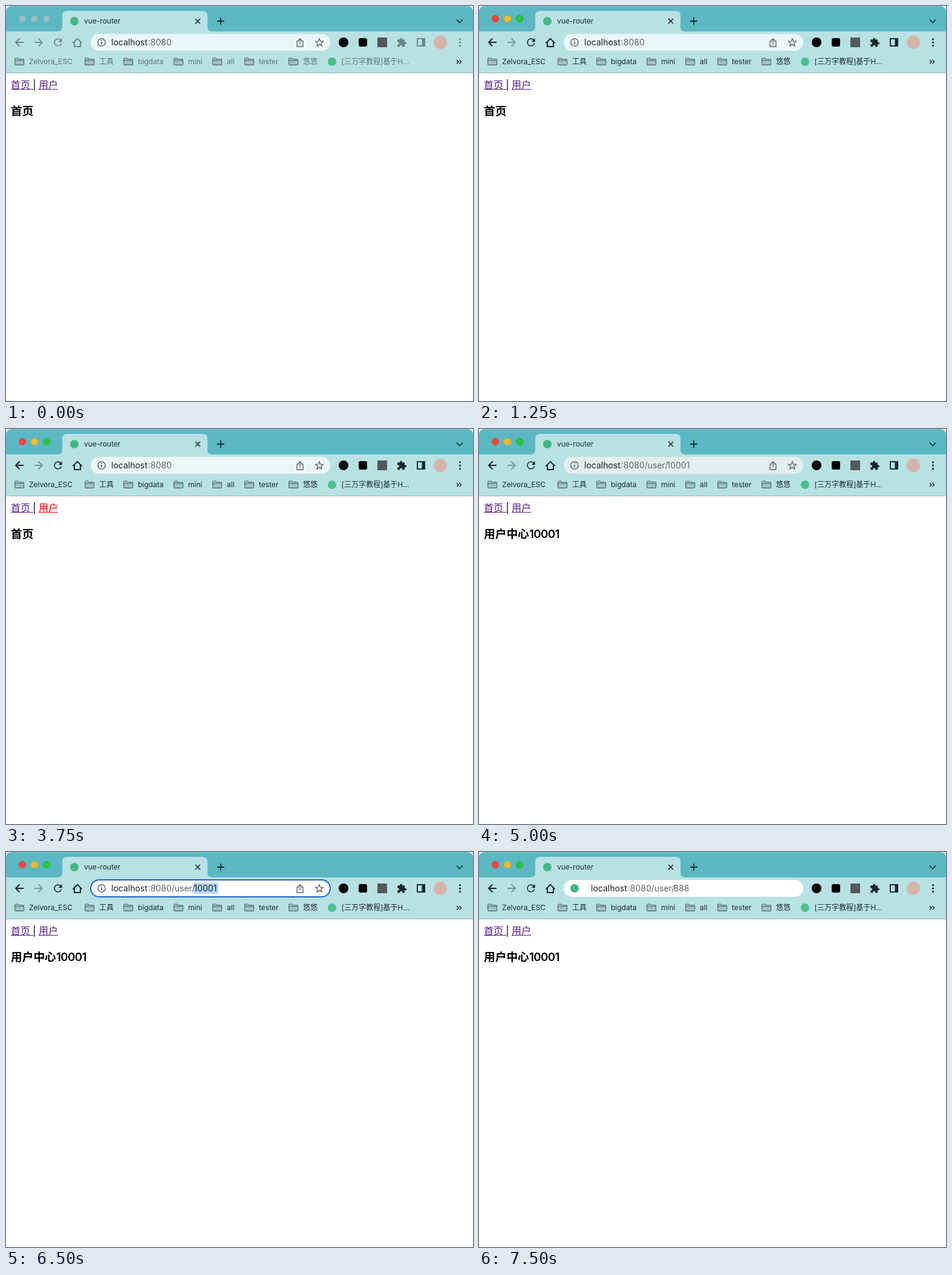
An HTML page for the animation above (8000 ms loop, 772 by 652 pixels).

```html
<!DOCTYPE html>
<html lang="zh-CN">
<head>
<meta charset="utf-8">
<title>vue-router</title>
<style>
  html, body { margin: 0; width: 100%; height: 100%; overflow: hidden; background: #fff; }
  svg { display: block; width: 772px; height: 652px; }
  text { font-family: Inter, "Noto Sans CJK SC", "Noto Sans CJK", sans-serif; white-space: pre; }
  .line { fill: none; stroke-linecap: butt; stroke-linejoin: miter; }
  .small { font-size: 12px; }
  .url { font-size: 14px; }
  .link { font-size: 16px; }
  .head { font-size: 18.72px; font-weight: 600; }
</style>
</head>
<body>
<svg id="stage" viewBox="0 0 772 652" xmlns="http://www.w3.org/2000/svg">
  <rect width="772" height="652" fill="#fff"/>

  <!-- window frame and tab -->
  <path d="M0 42V10Q0 0 10 0H762Q772 0 772 10V42Z" fill="#5bb8c2"/>
  <path class="line" d="M8 .5H764" stroke="#83cad1"/>
  <rect y="42" width="772" height="68" fill="#b8e1e4"/>
  <rect y="110" width="772" height="1" fill="#8fb9bd"/>
  <path d="M85 42Q93 42 93 34V16Q93 8 101 8H325Q333 8 333 16V34Q333 42 341 42Z" fill="#b8e1e4"/>
  <g id="lights"></g>
  <circle cx="113" cy="25" r="7" fill="#41b883"/>
  <text class="small" x="129" y="29" fill="#1f2d2f">vue-router</text>
  <path class="line" d="M313 21l8 8M321 21l-8 8" stroke="#1d2c2e" stroke-width="1.6"/>
  <path class="line" d="M349 25H361M355 19V31" stroke="#152f32" stroke-width="1.9"/>
  <path class="line" d="M745 22.5l5 5 5-5" stroke="#152f32" stroke-width="1.7"/>

  <!-- navigation buttons -->
  <g class="line" stroke-width="1.9">
    <path data-tint="stroke" d="M29 60H16.5M22.5 53.5L16 60L22.5 66.5"/>
    <path d="M47 60H59.5M53.5 53.5L60 60L53.5 66.5" stroke="#74979b"/>
    <path data-tint="stroke" d="M110.5 61.2L118 53.8L125.5 61.2M113 59.5V67H123V59.5"/>
  </g>
  <path data-tint="fill" transform="translate(76 50) scale(.83)"
    d="M17.65 6.35A7.96 7.96 0 0 0 12 4a8 8 0 1 0 7.73 10h-2.08A6 6 0 1 1 12 6c1.66 0 3.14.69 4.22 1.78L13 11h7V4z"/>

  <!-- address bar -->
  <rect id="bar" x="140" y="46" width="396" height="28" rx="14"/>
  <rect id="ring" x="140" y="46" width="396" height="28" rx="14" fill="none" stroke="#1c62cf" stroke-width="2"/>
  <rect id="mark" y="51" height="18" fill="#b3d5fd"/>
  <g id="idle">
    <g class="line" stroke="#5a6063" stroke-width="1.3">
      <circle cx="158" cy="60" r="6.2" stroke="#474d50"/>
      <path d="M158 59V63.5M158 56.3V57.8" stroke="#474d50" stroke-width="1.5"/>
      <path d="M484 58H481V67H491V58H488M486 63.5V54.5M483 57L486 54L489 57"/>
      <path id="star"/>
    </g>
  </g>
  <circle id="match" cx="158" cy="60" r="7" fill="#41b883"/>
  <g id="address">
    <text class="url" x="174" y="65" fill="#1f2426">localhost</text>
    <text class="url" id="path" x="234.7" y="65">:8080/user/</text>
    <text class="url" id="user" x="310.5" y="65"></text>
  </g>
  <rect id="caret" y="51" width="1" height="18" fill="#111"/>

  <!-- extension buttons -->
  <circle cx="558" cy="60" r="8" fill="#000"/>
  <rect x="583" y="53" width="14" height="14" rx="3" fill="#000"/>
  <rect x="614" y="52" width="16" height="16" fill="#53585a"/>
  <path data-tint="fill" transform="translate(645.6 51.8) scale(.714)"
    d="M20.5 11H19V7c0-1.1-.9-2-2-2h-4V3.5a2.5 2.5 0 0 0-5 0V5H4c-1.1 0-2 .9-2 2v3.8h1.5a2.7 2.7 0 0 1 0 5.4H2V20c0 1.1.9 2 2 2h3.8v-1.5a2.7 2.7 0 0 1 5.4 0V22H17c1.1 0 2-.9 2-2v-4h1.5a2.5 2.5 0 0 0 0-5z"/>
  <rect data-tint="stroke" x="680" y="54" width="12" height="12" fill="none" stroke-width="1.9"/>
  <rect data-tint="fill" x="687.5" y="54" width="5" height="12"/>
  <circle cx="718" cy="60" r="11" fill="#d6b3a9"/>
  <g data-tint="fill">
    <circle cx="750.5" cy="54.8" r="1.6"/><circle cx="750.5" cy="60.2" r="1.6"/><circle cx="750.5" cy="65.6" r="1.6"/>
  </g>

  <!-- bookmarks -->
  <g id="bookmarks"></g>
  <circle cx="539" cy="92" r="7" fill="#4cbf8d"/>
  <path class="line" d="M745 89l3 3-3 3M749.5 89l3 3-3 3" stroke="#1b2c2e" stroke-width="1.5"/>

  <!-- page -->
  <g id="home">
    <text class="link" x="8" y="136">首页</text>
    <rect x="8" y="137" width="37" height="1"/>
  </g>
  <text class="link" x="47" y="135.5" text-anchor="middle">|</text>
  <g id="users">
    <text class="link" x="54" y="136">用户</text>
    <rect x="54" y="137" width="32" height="1"/>
  </g>
  <text class="head" id="title" x="8" y="180"></text>
  <text class="head" id="number" x="83" y="180" letter-spacing="-.6">10001</text>
</svg>
<script>
const LOOP = 8000;
const $ = id => document.getElementById(id);
const set = (node, attrs) => {
  for (const key in attrs) node.setAttribute(key, attrs[key]);
  return node;
};
const add = (parent, tag, attrs, text = '') => {
  const node = set(document.createElementNS('http://www.w3.org/2000/svg', tag), attrs);
  node.textContent = text;
  return parent.appendChild(node);
};
const show = (id, on) => set($(id), { visibility: on ? 'visible' : 'hidden' });

const lightColors = [['#ff453a', '#d8362f'], ['#fdbb2d', '#dc9c22'], ['#28c840', '#1ea32f']];
const lights = lightColors.map((_, i) =>
  add($('lights'), 'circle', { cx: 27 + 20 * i, cy: 21, r: 5.6, 'stroke-width': .8 }));

const folders = [
  [14, 'Zelvora_ESC'], [130, '工具'], [194, 'bigdata'], [277, 'mini'],
  [341, 'all'], [394, 'tester'], [467, '悠悠']
];
const label = (x, text) => add($('bookmarks'), 'text', { x, y: 96, class: 'small' }, text);
for (const [x, name] of folders) {
  add($('bookmarks'), 'path', {
    d: `M${x + .6} 96V87.2q0-1.2 1.2-1.2h4l1.6 1.8h7q1.2 0 1.2 1.2v7q0 1.4-1.2 1.4h-12.6q-1.2 0-1.2-1.4ZM${x + .6} 89.8h15`,
    fill: '#a1c1c3', stroke: '#52676a', 'stroke-width': 1.1
  });
  label(x + 24, name);
}
label(554.5, '[三万字教程]基于H…');

const starPoints = Array.from({ length: 10 }, (_, i) => {
  const r = i % 2 ? 2.9 : 6.8, a = Math.PI * (i / 5 - .5);
  return `${518 + r * Math.cos(a)} ${60.5 + r * Math.sin(a)}`;
});
set($('star'), { d: `M${starPoints.join('L')}Z` });

const tinted = [...document.querySelectorAll('[data-tint]')];

function draw(t) {
  const within = (from, to) => t >= from && t < to;
  const active = t >= 500;
  const visited = t >= 4000;
  const typing = t >= 6750;
  const focused = within(5250, 6750);
  const allSelected = within(5250, 5500);

  lights.forEach((light, i) => {
    const [fill, stroke] = active ? lightColors[i] : ['#96bec2', '#86b0b5'];
    set(light, { fill, stroke });
  });
  for (const node of tinted) set(node, { [node.dataset.tint]: active ? '#18282a' : '#68878b' });
  set($('bookmarks'), { fill: active ? '#1b292b' : '#5d7477' });

  const barFill = t >= 5250 ? '#fff' : t >= 4500 ? '#e3efef' : '#eaf6f7';
  set($('bar'), { fill: barFill });
  show('ring', focused);
  show('idle', !typing);
  show('match', typing);

  const start = allSelected ? 174 : 310;
  set($('mark'), { x: start, width: 351 - start });
  show('mark', focused);

  const shift = typing ? 11 : 0;
  set($('address'), { transform: `translate(${shift})` });
  $('path').textContent = visited ? ':8080/user/' : ':8080';
  set($('path'), { fill: allSelected ? '#1f2426' : '#5f686b' });
  $('user').textContent = !visited ? '' : !typing ? '10001' : t < 7000 ? '8' : '888';
  set($('user'), { fill: focused ? '#1f2426' : '#5f686b' });
  set($('caret'), { x: t < 7000 ? 330 : 349 });
  show('caret', within(6750, 7500));

  // links turn red only while pressed
  set($('home'), { fill: within(2000, 2500) ? '#f00' : '#551a8b' });
  set($('users'), { fill: within(3750, 4000) ? '#f00' : '#551a8b' });
  $('title').textContent = visited ? '用户中心' : '首页';
  show('number', visited);
}

function tick() {
  draw(performance.now() % LOOP);
  requestAnimationFrame(tick);
}
tick();
</script>
</body>
</html>
```
